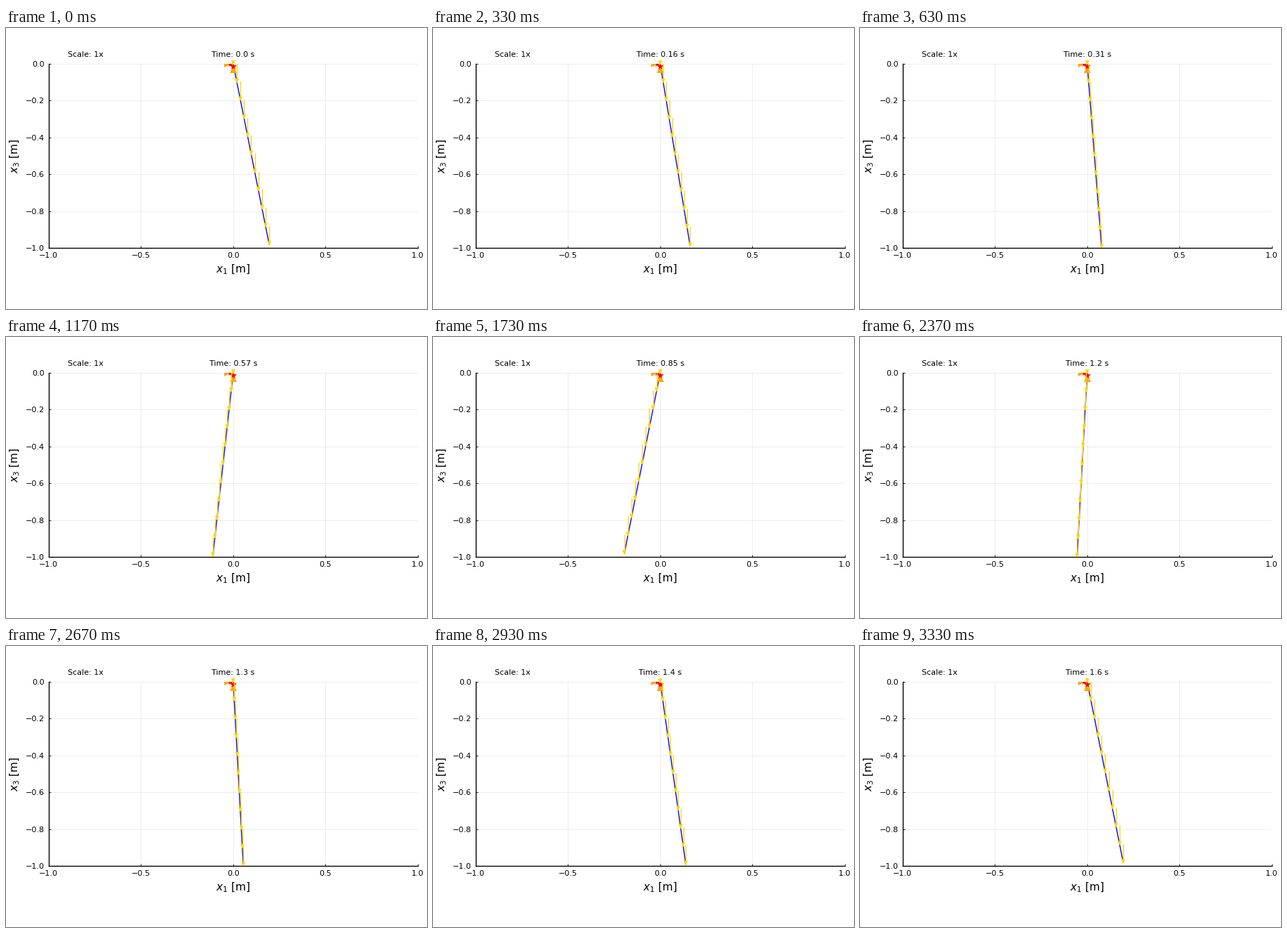
A matplotlib script that plays this animation: 600x400 px, repeating every 3360 ms.

```python
import math

import matplotlib.pyplot as plt
import numpy as np
from matplotlib.animation import FuncAnimation
from matplotlib.collections import PolyCollection

W, H, DPI = 600, 400, 100
LOOP, TICK = 3360, 20            # ms
STEPS, FPS = 100, 30             # simulation steps per swing, playback rate
LEFT, RIGHT, TOP, BOTTOM = 60.7, 586.9, 51.0, 313.1
PX = 2 / (RIGHT - LEFT)          # data units per pixel, horizontally
PY = 1 / (BOTTOM - TOP)          # and vertically

NODES = np.linspace(0, 1, 11)
SWING = math.pi / 16
PERIOD = 2 * math.pi * math.sqrt(2 / (3 * 9.81))   # rod hung at one end
FORCE = 0.1
HEAD = np.array([(-2.08, 4.17), (0, 0), (2.08, 4.17)]) * (PX, PY)

plt.rcParams.update({
    "font.family": "DejaVu Sans",
    "font.size": 8,
    "mathtext.fontset": "dejavusans",
})

fig = plt.figure(figsize=(W / DPI, H / DPI), dpi=DPI, facecolor="white")
ax = fig.add_axes([LEFT / W, 1 - BOTTOM / H,
                   (RIGHT - LEFT) / W, (BOTTOM - TOP) / H])
ax.set(xlim=(-1, 1), ylim=(-1, 0),
       xticks=np.linspace(-1, 1, 5), yticks=np.linspace(-1, 0, 6))
ax.set_xlabel("$x_1$ [m]", fontsize=11)
ax.set_ylabel("$x_3$ [m]", fontsize=11)
ax.tick_params(direction="in", length=2, width=0.6, pad=4.4, labelsize=8)
ax.grid(color="black", alpha=0.1, linewidth=0.5)
ax.set_axisbelow(True)
ax.spines[["top", "right"]].set_visible(False)
for side in ("left", "bottom"):
    ax.spines[side].set_linewidth(1)


def label(x, text):
    return ax.text(x, 0.049, text, ha="center", va="center", fontsize=8)


def marker(x, y, shape, size, color, z):
    ax.plot([x], [y], marker=shape, ms=size, mfc=color, mew=0,
            linestyle="none", zorder=z)


label(-0.8, "Scale: 1x")
clock = label(0, "")

# Supports at the pivot
marker(-0.03, 0, ">", 6.5, "orange", 3)
marker(0, -0.03, "^", 6.5, "orange", 3)
marker(-0.015, 0, "*", 8, "red", 4)
marker(0, -0.015, "*", 8, "red", 4)

rod, = ax.plot([], [], color="blue", linewidth=1, zorder=2.5)
shafts, = ax.plot([], [], color="gold", linewidth=1, zorder=5)
heads = PolyCollection([], facecolor="gold", edgecolor="gold", linewidth=1,
                       joinstyle="round", clip_on=False, zorder=6)
ax.add_collection(heads, autolim=False)


def step_at(ms):
    """Simulation step on show, with step starts rounded to 10 ms."""
    return int((ms + 5) * FPS / 1000)


def draw(i):
    step = step_at((i + 0.5) * TICK)
    # Velocity is staggered by half a step
    angle = SWING * math.cos(2 * math.pi * (step - 0.5) / STEPS)
    x, y = NODES * math.sin(angle), -NODES * math.cos(angle)
    gap = np.full_like(x, np.nan)

    rod.set_data(x, y)
    shafts.set_data(np.column_stack([x, x, gap]).ravel(),
                    np.column_stack([y + FORCE, y, gap]).ravel())
    heads.set_verts([HEAD + node for node in zip(x, y)])

    seconds = float(f"{PERIOD * step / STEPS:.2g}")
    clock.set_text(f"Time: {seconds} s")
    return rod, shafts, heads, clock


anim = FuncAnimation(fig, draw, frames=LOOP // TICK, interval=TICK,
                     repeat=True, repeat_delay=0, blit=False)
plt.show()
```
